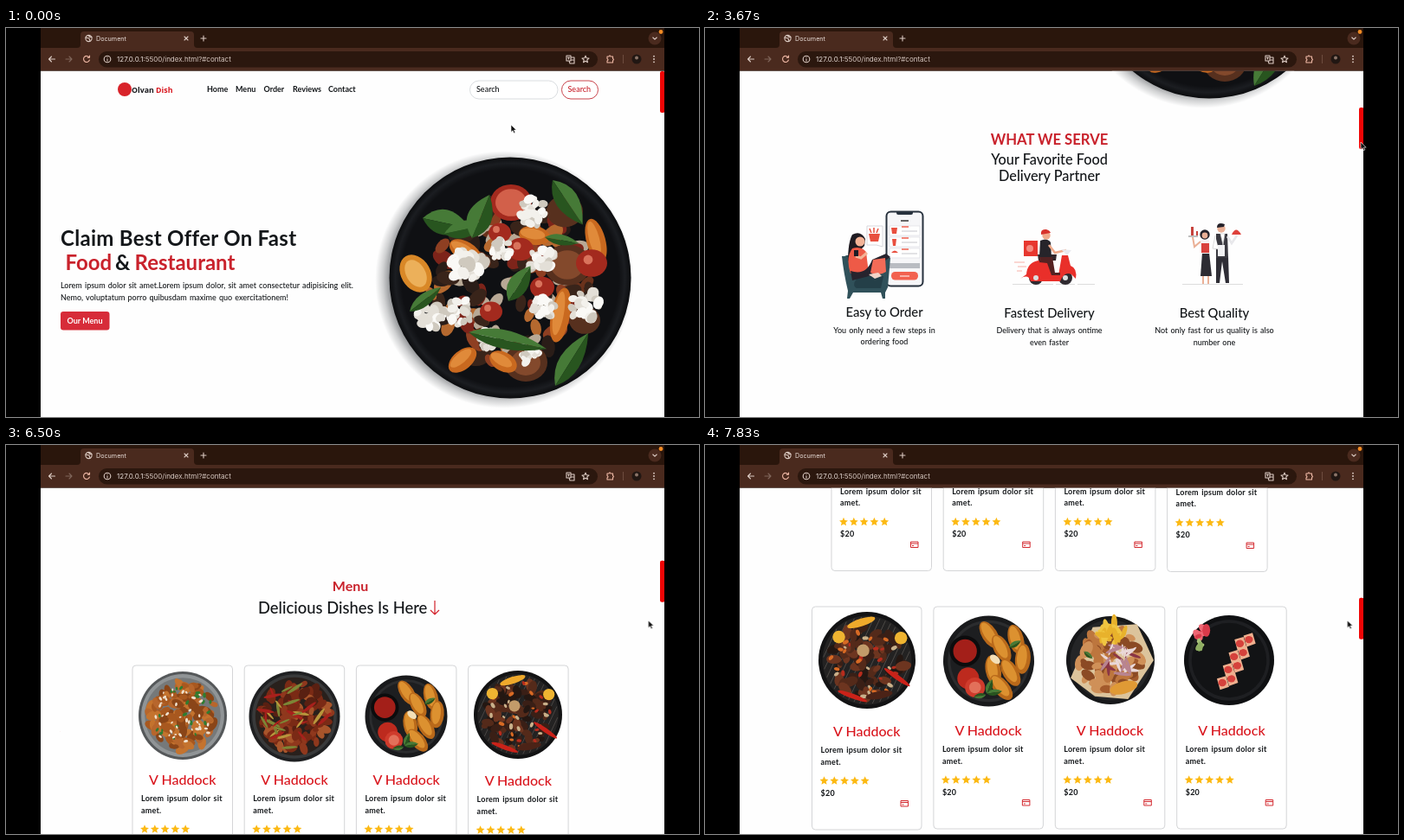
These frames come from a looping animation (800 by 450 pixels, 8000 ms). An HTML page:

```html
<!DOCTYPE html>
<html lang="en">
<head>
<meta charset="utf-8">
<title>Document</title>
<style>
@property --s { syntax: "<number>"; inherits: true; initial-value: 0; }
html, body { margin: 0; width: 100%; height: 100%; overflow: hidden; background: #000; }
svg { display: block; width: 800px; height: 450px; font-family: Lato, "Open Sans", sans-serif; fill: #14171a; animation: scroll 8s step-end infinite; }
.ui { font: 8px Inter, Roboto, sans-serif; fill: #eadfda; }
.icon { fill: none; stroke: #dccbc3; stroke-width: 1.1; stroke-linecap: round; stroke-linejoin: round; }
.mid { text-anchor: middle; }
.bold { font-weight: 700; }
.nav { font-size: 9px; font-weight: 700; }
.p { font-size: 9px; font-weight: 500; word-spacing: .9px; }
.note { font-size: 9px; font-weight: 700; letter-spacing: .22px; word-spacing: 1px; }
.big { font-size: 24px; font-weight: 700; }
.h { font-size: 16.3px; font-weight: 500; }
.t { font-size: 14.8px; font-weight: 500; }
.red { fill: #c9222c; }
#page { transform: translateY(calc(var(--s) * -1px)); }
#thumb { transform: translateY(calc(var(--s) * .121px)); }
#arrow { animation: point 8s step-end infinite; }
#ring { animation: ring 8s step-end infinite; }
@keyframes scroll {
  0% { --s: 0; }
  41.6% { --s: 277; }
  43.7% { --s: 330; }
  45.8% { --s: 347; }
  49.9% { --s: 349; }
  52.1% { --s: 350; }
  54.1% { --s: 351; }
  60.3% { --s: 364; }
  62.4% { --s: 374; }
  66.6% { --s: 386; animation-timing-function: steps(3); }
  72.8% { --s: 518; animation-timing-function: steps(4); }
  81.2% { --s: 693; animation-timing-function: steps(4); }
  89.6% { --s: 878; animation-timing-function: steps(4); }
  97.8%, 100% { --s: 1048.5; }
}
@keyframes point {
  0% { transform: translate(583px, 112px); }
  16.6% { transform: translate(590px, 114px); }
  20.8% { transform: translate(635px, 118px); }
  22.9% { transform: translate(695px, 123px); }
  24.9% { transform: translate(738px, 127px); }
  31.2% { transform: translate(752px, 128px); }
  35.3% { transform: translate(757px, 129px); }
  37.4% { transform: translate(757px, 132px); }
  49.9% { transform: translate(752px, 160px); }
  52.1% { transform: translate(745px, 190px); }
  54.1%, 100% { transform: translate(741.5px, 203px); }
}
@keyframes ring {
  0% { transform: translate(590px, 114px); opacity: 0; }
  20.8% { transform: translate(630px, 118px); opacity: 1; }
  22.9% { transform: translate(690px, 123px); }
  24.9% { transform: translate(738px, 127px); }
  31.2% { transform: translate(752px, 129px); }
  35.3%, 100% { transform: translate(757px, 130px); opacity: 1; }
}
</style>
</head>
<body>
<svg viewBox="0 0 800 450">
  <defs>
    <clipPath id="view"><path d="M40 49.500H760V450H40z"/></clipPath>
    <radialGradient id="shade">
      <stop offset=".88" stop-color="#8d8f92"/>
      <stop offset=".94" stop-color="#d0d1d2"/>
      <stop offset="1" stop-color="#fff"/>
    </radialGradient>
    <radialGradient id="dark">
      <stop offset=".9" stop-color="#0f1013"/>
      <stop offset=".95" stop-color="#1b1d21"/>
      <stop offset="1" stop-color="#0b0c0e"/>
    </radialGradient>
  </defs>

  <g clip-path="url(#view)">
    <path d="M40 49H760V450H40z" fill="#fefefe"/>
    <g id="page">
      <circle cx="137" cy="71" r="8" fill="#d8232a"/>
      <text x="145" y="75" font-size="8.8" font-weight="700" font-family="Open Sans, sans-serif" fill="#1b1b1f">Olvan <tspan fill="#d8141c">Dish</tspan></text>
      <g class="nav">
        <text x="232" y="74">Home</text><text x="265" y="74">Menu</text><text x="297.5" y="74">Order</text>
        <text x="331" y="74">Reviews</text><text x="372" y="74">Contact</text>
      </g>
      <rect x="535.5" y="61" width="101.5" height="21" rx="10.5" fill="#fff" stroke="#dadde0"/>
      <text x="543" y="74" class="p">Search</text>
      <rect x="641.5" y="61" width="42" height="21" rx="10.5" fill="#fff" stroke="#c9444c"/>
      <text x="648.5" y="74" class="p red">Search</text>

      <text x="63" y="252" class="big" letter-spacing=".3">Claim Best Offer On Fast</text>
      <g class="big">
        <text x="68.5" y="280" class="red">Food</text><text x="126" y="280">&amp;</text><text x="148.5" y="280" class="red">Restaurant</text>
      </g>
      <text x="63" y="301" class="p">Lorem ipsum dolor sit amet.Lorem ipsum dolor, sit amet consectetur adipisicing elit.</text>
      <text x="63" y="315" class="p">Nemo, voluptatum porro quibusdam maxime quo exercitationem!</text>
      <rect x="63" y="328" width="56.5" height="21.5" rx="3.2" fill="#d72c39"/>
      <text x="91" y="341.5" class="nav mid" fill="#fff">Our Menu</text>
      <g id="hero"></g>

      <g transform="translate(0 364)">
        <text x="397.5" y="118" class="mid bold red" font-size="16.7">WHAT WE SERVE</text>
        <text x="397.5" y="141" class="mid h">Your Favorite Food</text>
        <text x="397.5" y="160" class="mid h">Delivery Partner</text>

        <!-- armchair and phone -->
        <rect x="209.5" y="195.5" width="42" height="86" rx="5" fill="#f6f6f8" stroke="#27313d" stroke-width="2"/>
        <path d="M221 195h19v2q0 2-2 2h-15q-2 0-2-2z" fill="#27313d"/>
        <path d="M226 206h9" stroke="#333" stroke-width="1.5"/>
        <path d="M213 212h35v11h-35zM213 225h35v11h-35zM213 238h35v11h-35z" fill="#fff" stroke="#dfdfe4" stroke-width=".7"/>
        <path d="M227 213h8M227 226h8M227 239h8" stroke="#f0614f" stroke-width="1.5"/>
        <path d="M227 218h18M227 231h18M227 244h18" stroke="#c6c6cc" stroke-width="1.2"/>
        <path d="M215 214h7l-1 7h-5zM216 227h5l-1 8h-3zM215 243q4-5 8 0z" fill="#e94f3f"/>
        <path d="M213 255h35v6h-35z" fill="#b9bcc2"/>
        <rect x="215" y="265" width="31" height="9.5" rx="4.5" fill="#f2614f"/>
        <path d="M225 270h11" stroke="#fff"/>
        <path d="M187 212h18v24l-7-2h-11z" fill="#fff" stroke="#d7d7dc"/>
        <path d="M189 221h13l-2 9h-9z" fill="#e8503f"/>
        <path d="M192 220l-2-5m5 5v-6m3 6l2-5" stroke="#e8503f" stroke-width="1.5"/>
        <path d="M161 247q9-4 14 6l4 19h22l1-18q3-8 12-5l-3 34-3 6v7h-3l-2-7h-32l-4 7h-3l1-9q-5-21-7-40z" fill="#30515a"/>
        <path d="M178 270h28l-3 14h-28q-7-4 3-14z" fill="#243f48"/>
        <path d="M170 222q10-5 15 5l-1 8q-4 5-9 6l-6 8-4 4q0-22 5-31z" fill="#1f1b22"/>
        <circle cx="179" cy="230" r="5.5" fill="#f3b397"/>
        <path d="M170 238q10-3 16 4l3 25h-21q-6-18 2-29z" fill="#ee5a47"/>
        <path d="M187 243l-7 6-6-2" fill="none" stroke="#f3b397" stroke-width="3"/>
        <path d="M172 240h5v7h-5z" fill="#1d1d26"/>
        <path d="M168 264q18 6 25-13l16-7 5 4-12 8-5 12-27 7z" fill="#26232d"/>
        <path d="M194 251l14-2 1 16q-9 6-18 1z" fill="#f36b57"/>
        <path d="M189 268l11-2 4 4-8 3z" fill="#f3d5c8"/>

        <!-- scooter -->
        <path d="M355 279.5h95" stroke="#ddd" stroke-dasharray="22 3"/>
        <path d="M357 254h12M361 259h10M360 264h6" stroke="#f49b91" stroke-width=".8"/>
        <path d="M368 229h16v18h-16z" fill="#e7372f"/><circle cx="375" cy="238" r="4" fill="#f58a80"/>
        <circle cx="382" cy="272" r="8" fill="#2f2a30"/><circle cx="416" cy="272" r="8" fill="#2f2a30"/>
        <path d="M371 268q1-14 14-16h14l3 17h6l4-23h7l3 12q8 3 6 15l-5-5q-8-4-13 8h-34q-3-9-12-3z" fill="#e92f2a"/>
        <circle cx="382" cy="272" r="3" fill="#ddd"/><circle cx="416" cy="272" r="3" fill="#ddd"/>
        <path d="M384 245h22l-1 7h-20z" fill="#33262a"/>
        <path d="M386 248h15l3 18h6v3h-10l-5-14-9-1z" fill="#542222"/>
        <path d="M387 229q8-4 12 2l1 17h-14z" fill="#26242a"/>
        <path d="M397 234l7 9 13-3" fill="none" stroke="#efaa8b" stroke-width="2.6"/>
        <path d="M411 239l12 1-5 6z" fill="#e9e9ee"/>
        <circle cx="394" cy="223" r="4.7" fill="#efaa8b"/>
        <path d="M388 222q-1-7 6-6 4 1 5 4z" fill="#d7332c"/>

        <!-- waiters -->
        <path d="M551 279.5h70" stroke="#ddd"/>
        <path d="M574 243h8l3 27h-13z" fill="#2d2c33"/>
        <path d="M575 270v9M581 270v9" stroke="#eab096" stroke-width="2"/>
        <path d="M572 228h10l1 16h-10z" fill="#f4f1f1"/>
        <path d="M573 232h9v11h-9z" fill="#d9413c"/>
        <path d="M572 230l-7 6-2-11" fill="none" stroke="#eab096" stroke-width="2"/>
        <circle cx="577" cy="222" r="5.7" fill="#25222a"/><circle cx="577" cy="223" r="3.4" fill="#eab096"/>
        <path d="M558 224h11" stroke="#aaa" stroke-width="1.4"/><path d="M561 213h3v10h-3zM567 218h2v5h-2z" fill="#c6423c"/>
        <path d="M590 247h14l1 31h-4l-4-25-3 25h-4z" fill="#2e2d35"/>
        <path d="M590 221h13l1 28h-14z" fill="#3a3940"/>
        <path d="M595 221h5l-2 13zM589 223l-3 15 7 1" fill="#fff" stroke="#ccc" stroke-width=".7"/>
        <path d="M592 234h8v13h-8z" fill="#f1f1f3"/>
        <path d="M603 224l5 8 6-9" fill="none" stroke="#e8e8eb" stroke-width="2.6"/>
        <circle cx="596" cy="215" r="4.7" fill="#eab096"/><path d="M591 214q0-7 9-4l-1 3z" fill="#25222a"/>
        <path d="M608 222q5-11 11 0z" fill="#de413b"/>

        <g class="mid t"><text x="207" y="317">Easy to Order</text><text x="397.5" y="317.5">Fastest Delivery</text><text x="588" y="317.5">Best Quality</text></g>
        <g class="mid p">
          <text x="207" y="336">You only need a few steps in</text><text x="207" y="349">ordering food</text>
          <text x="397.5" y="336">Delivery that is always ontime</text><text x="397.5" y="349.5">even faster</text>
          <text x="588" y="336">Not only fast for us quality is also</text><text x="588" y="349.5">number one</text>
        </g>
      </g>

      <text x="397.5" y="861.5" class="mid bold red" font-size="16">Menu</text>
      <text x="291" y="888" font-size="18.4" font-weight="500">Delicious Dishes Is Here</text>
      <path d="M495 873v16m-5-5l5 5 5-5" fill="none" stroke="#d2202a" stroke-width="1.2"/>
      <g id="cards"></g>
      <circle id="ring" r="12" fill="none" stroke="#222" stroke-width="1.1"/>
    </g>
    <rect id="thumb" x="755" y="50" width="5.5" height="48" rx="2" fill="#f00606"/>
  </g>

  <!-- browser bar -->
  <path d="M40 0H760V24H40z" fill="#2a160c"/>
  <path d="M40 23H760V49.500H40z" fill="#4a2a1e"/>
  <path d="M82 23q4 0 4-4V8q0-4 4-4h123q4 0 4 4v11q0 4 4 4z" fill="#4a2a1e"/>
  <rect x="107" y="27" width="576" height="18.5" rx="9.2" fill="#2b170e"/>
  <path d="M712.5 31v10" stroke="#6d4c3f"/>
  <text x="104" y="14.7" class="ui" style="font-size:7.2px">Document</text>
  <text x="128" y="39" class="ui">127.0.0.1<tspan fill="#d8c9c2">:5500/index.html?#contact</tspan></text>
  <g class="icon">
    <circle cx="95.5" cy="12" r="3.6"/><path d="M92 11l4 1 1 3M95 8.5l2 2 2 0"/>
    <path d="M206 10l4 4m0-4l-4 4M225 12h6m-3-3v6"/>
    <circle cx="749" cy="12" r="7.5" fill="#4a2a1e" stroke="none"/><path d="M746.8 11l2.2 2.2 2.2-2.2"/>
    <path d="M56.5 36h-7m3-3l-3 3 3 3"/><path d="M69 36h7m-3-3l3 3-3 3" stroke="#80665b"/>
    <path d="M96 34a3.5 3.5 0 1 0 .4 3M96.5 32v2.3h-2.3" stroke="#efb9a6"/>
    <circle cx="117" cy="36" r="3.8"/><path d="M117 36v2m0-4v.1"/>
    <path d="M647 32h5v6h-5zM652 34h4v7h-5l-1-3M648.5 34h2m-1 0v2M653 37h2"/>
    <path id="fav" transform="translate(669 36.3)"/>
    <path d="M694 33h2q1-2.5 2 0h2.5v2.5q2 1 0 2v2.5h-6.5v-2q2-1.2 0-2.5z" stroke="#efb9a6"/>
  </g>
  <circle cx="728" cy="36" r="5.5" fill="#211713"/><circle cx="728" cy="34.5" r="2" fill="#8b7468"/>
  <g fill="#e4d5cd"><circle cx="748" cy="32.7" r=".9"/><circle cx="748" cy="36" r=".9"/><circle cx="748" cy="39.3" r=".9"/></g>
  <circle cx="756" cy="4.5" r="2.4" fill="#f08a24"/>

  <path id="arrow" d="M0 0v8.5l2-1.8 1.4 3 1.5-.7-1.4-2.9h2.7z" fill="#111" stroke="#fff" stroke-width=".6"/>
</svg>
<script>
const $ = id => document.getElementById(id);
let seed = 7;
const rnd = () => (seed = seed * 16807 % 2147483647) / 2147483647;
const pick = list => list[Math.floor(rnd() * list.length)];

const oval = (x, y, rx, ry, fill, turn = 0) =>
  `<ellipse rx="${rx}" ry="${ry}" fill="${fill}" transform="translate(${x} ${y}) rotate(${turn})"/>`;
const disc = (r, fill, x = 0, y = 0) => oval(x, y, r, r, fill);

// Two halves, the upper one lighter, with a pointed tip
function leaf(x, y, len, turn, wide = .8) {
  const half = (bend, fill) => `<path d="M0 0Q${len * .4} ${bend * wide * len} ${len} 0z" fill="${fill}"/>`;
  return `<g transform="translate(${x} ${y}) rotate(${turn})">${half(-.55, '#467a37')}${half(.5, '#28551f')}</g>`;
}

// Scatter of uneven chunks inside a circle
function bits(n, reach, size, tones, x = 0, y = 0, flat = .6) {
  let out = '';
  while (n--) {
    const a = rnd() * 6.283, d = Math.sqrt(rnd()) * reach, r = size * (.6 + rnd() * .6);
    out += oval(x + Math.cos(a) * d, y + Math.sin(a) * d, r, r * flat, pick(tones), rnd() * 180);
  }
  return out;
}

const starPath = (R, r) => 'M' + Array.from({ length: 10 }, (_, i) => {
  const a = i * Math.PI / 5 - Math.PI / 2, k = i % 2 ? r : R;
  return (Math.cos(a) * k).toFixed(2) + ' ' + (Math.sin(a) * k).toFixed(2);
}).join('L') + 'z';

function hero() {
  const spots = (list, fill) => list.map(([x, y, r]) => oval(x, y, r, r * .88, fill)).join('');
  const sticks = [[681, 246, 26, 75], [640, 332, 32, 100], [610, 240, 18, 10], [527, 384, 19, -40], [574, 386, 17, 30], [530, 258, 20, 30]];
  const tomatoes = [[570, 237, 13], [594, 256, 15], [619, 300, 14], [560, 328, 13], [676, 272, 18]];
  const curds = [[607, 213, 19], [571, 257, 15], [533, 276, 23], [619, 270, 18], [490, 333, 19], [525, 329, 17], [602, 376, 14], [668, 322, 21], [556, 360, 13], [620, 324, 15]];
  const leaves = [[481, 220, 56, 12, 1], [506, 238, 48, -12, .8], [538, 243, 54, -68, 1], [631, 176, 62, 56, .8], [580, 316, 48, -58, .9], [466, 328, 46, -38, .6], [534, 352, 92, 12, .45], [634, 414, 72, -58, .65], [622, 242, 40, 10, .6]];
  return oval(575, 291, 149, 149, 'url(#shade)') + disc(139.5, 'url(#dark)', 582, 289) +
    bits(120, 92, 13, ['#8e3f22', '#6a321c', '#b5692f', '#7d241a', '#39241a', '#2a1d18', '#b8a996'], 582, 296) +
    spots([[648, 274, 27], [600, 387, 25], [645, 212, 21], [668, 338, 18]], '#57301e') +
    spots([[648, 274, 19], [600, 387, 17]], '#83492c') +
    oval(473, 284, 23, 17, '#d98827', 60) + oval(473, 284, 17, 11, '#ecb05a', 60) +
    sticks.map(([x, y, r, turn]) => oval(x, y, r, 11, '#c9691f', turn) + oval(x - 2, y - 2, r * .8, 6, '#e08a3a', turn)).join('') +
    spots([[583, 202, 24], ...tomatoes], '#a32a1e') + spots([[583, 202, 18]], '#d2604a') +
    tomatoes.map(([x, y, r]) => disc(r * .3, '#d9735c', x - 4, y - 4)).join('') +
    curds.map(([x, y, r]) => bits(22, r * .85, r * .36, ['#f3f1ec', '#e3dfd7', '#faf9f6', '#cfc9be'], x, y, .75)).join('') +
    leaves.map(l => leaf(...l)).join('');
}

// Each dish is drawn on a plate of radius 100
const dishes = {
  curry: () => disc(100, '#55585a') + disc(94, '#909496') + disc(86, '#76797a') +
    bits(120, 76, 15, ['#a8581f', '#c4732e', '#8a4518', '#b7662c']) + bits(22, 70, 5, ['#2f7c30']) + bits(40, 70, 4.5, ['#efe0cd']),
  wok: () => disc(100, '#1f2022') + disc(93, '#38393a') + disc(86, '#29201c') +
    bits(120, 75, 14, ['#7a2a15', '#8f381d', '#592012', '#a8552b']) + bits(30, 74, 18, ['#a8201c', '#b8963c', '#7c8636'], 0, 0, .18),
  nuggets: () => disc(100, '#191a1c') + disc(90, '#2b2c2e') + disc(84, '#1d1e20') +
    disc(34, '#0c0c0d', -52, -22) + disc(26, '#a31f19', -52, -22) +
    [[2, -58, 58], [28, -28, 62], [60, -48, 75], [10, 20, 80], [48, 25, 60], [75, -5, 95], [28, 58, 50]]
      .map(([x, y, a]) => oval(x, y, 33, 17, '#b9691a', a) + oval(x - 2, y - 3, 27, 11, '#dc9130', a)).join('') +
    oval(14, -4, 13, 8, '#f3dfb8', 40) + disc(24, '#bd2a1e', -45, 38) + disc(22, '#cf3b2c', -30, 58) + disc(13, '#e2705a', -30, 58) +
    leaf(-4, 72, 34, -70) + leaf(-4, 72, 34, -10) + leaf(-6, 74, 28, 170) + leaf(45, -30, 30, -30),
  grill: () => disc(100, '#131314') + disc(92, '#232222') +
    Array.from({ length: 15 }, (_, i) => { const x = i * 12 - 84, h = Math.sqrt(8100 - x * x); return `<path d="M${x} ${-h}V${h}" stroke="#514c49" stroke-width="1.5" transform="rotate(25)"/>`; }).join('') +
    bits(80, 76, 14, ['#3a1f16', '#542a1a', '#6d3520', '#241712']) + bits(34, 75, 6, ['#d86a24', '#b72c1d', '#c9b08a']) +
    disc(13, '#efb431', -58, -48) + disc(13, '#efb431', 70, -46) + oval(-12, -78, 30, 8, '#efa92b', -18) + disc(13, '#c29b6a', -8, -20) +
    oval(62, 35, 32, 5, '#ca2219', 35) + oval(-30, 74, 32, 5, '#ca2219', 20) + oval(25, 72, 28, 8, '#4b2317', -10),
  platter: () => disc(100, '#17181a') + disc(91, '#242527') +
    '<path d="M-90 40L-40-75 60-82 98 0 40 88-35 82z" fill="#dcc49c"/>' +
    bits(60, 70, 18, ['#a35a2c', '#bd763e', '#8b4a24', '#cf9058']) + bits(24, 28, 17, ['#f0c540', '#e8b22c'], 5, -62, .35) +
    bits(24, 34, 18, ['#ead8d8', '#b88490', '#8b3645'], 22, 0, .2) + oval(30, 62, 32, 14, '#e09a35', -15) + leaf(-60, -20, 26, 40),
  sushi: () => disc(100, '#0f1012') + disc(90, '#1e1f22') + disc(83, '#121315') +
    bits(9, 14, 12, ['#d93a4a', '#ee6673'], -60, -60) + bits(7, 9, 9, ['#8fae62', '#a9c27a'], -66, -34) +
    Array.from({ length: 8 }, (_, i) => {
      const x = (i >> 1) * 13 - 14 + (i % 2) * 20, y = 54 - (i >> 1) * 29 - (i % 2) * 9;
      return `<path d="M${x - 13} ${y - 13}l20-6 7 24-20 7z" fill="#efb08f"/>` + oval(x - 1, y - 4, 9, 8, '#d6423c');
    }).join('')
};

const star = starPath(5.2, 2.4);
function card(x, y, w, h, drop, dish, px, py, r) {
  const top = y + drop, left = x + 10;
  const stars = [0, 1, 2, 3, 4].map(i => `<path d="${star}" transform="translate(${x + 14 + i * 11.8} ${top + 51.5})" fill="#fcb913"/>`).join('');
  return `<rect x="${x}" y="${y}" width="${w}" height="${h}" rx="4" fill="#fff" stroke="#d4d5d7"/>
    <g transform="translate(${px} ${py}) scale(${r / 100})">${dishes[dish]()}</g>
    <text x="${x + w / 2}" y="${top}" class="mid" font-size="16" font-weight="500" fill="#d9141c">V Haddock</text>
    <g class="note"><text x="${left}" y="${top + 19}">Lorem ipsum dolor sit</text>
    <text x="${left}" y="${top + 32.5}">amet.</text><text x="${left}" y="${top + 68.5}">$20</text></g>${stars}
    <path transform="translate(${x + w - 24} ${top + 74.5})" d="M0 0h8.5v6.5h-8.5zM0 2h8.5M1.5 4.5h2" fill="none" stroke="#d42a30"/>`;
}

$('fav').setAttribute('d', starPath(4.2, 1.9));
$('hero').innerHTML = hero();
const rowA = [['curry', 204, 128, 51], ['wok', 333, 129, 52.5], ['nuggets', 462, 129, 47.5], ['grill', 591, 127, 51]];
const rowB = [['grill', 187, 249, 56], ['nuggets', 327.5, 250, 52.5], ['platter', 468, 249, 51], ['sushi', 605, 249, 52]];
$('cards').innerHTML =
  rowA.map(([dish, px, py, r], i) => card(146 + i * 129.2, 948, 115.5, i === 3 ? 247 : 246, i === 3 ? 139 : 138, dish, px, py + 878, r)).join('') +
  rowB.map(([dish, px, py, r], i) => card(123.5 + i * 140.4, 1235.5, 126.5, i ? 257 : 258, i ? 149 : 150, dish, px, py + 1048.5, r)).join('');
</script>
</body>
</html>
```
